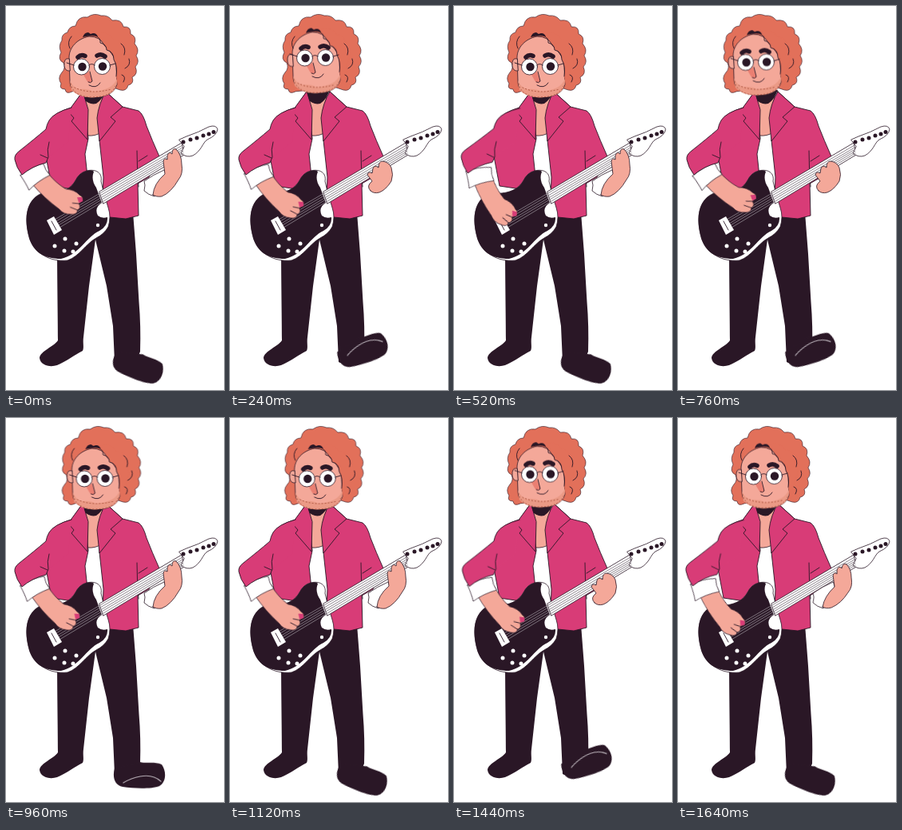
Write an HTML page without scripts that moves like this. It is 273x480 px and loops after 1.68 s.

```html
<!DOCTYPE html>
<html lang="en">
<head>
<meta charset="utf-8">
<title>Guitar player</title>
<style>
  html, body { margin: 0; width: 100%; height: 100%; overflow: hidden; background: #fff; }
  svg { display: block; width: 100vw; height: 100vh; }
  path, circle { stroke-linecap: round; stroke-linejoin: round; }
  .ink { fill: #2a1726; }
  .line { fill: none; stroke: #2a1726; stroke-width: .9; }
  .pink { fill: #d83c77; stroke: #2a1726; stroke-width: .9; }
  .skin { fill: #f4a899; stroke: #2a1726; stroke-width: .8; }
  .hair { fill: #e2705a; stroke: #2a1726; stroke-width: .6; }
  .white { fill: #fff; stroke: #2a1726; stroke-width: .8; }
  .plain { fill: #fff; }
  .bare { stroke: none; }

  .head, .nod, .foot, .crease, .strum, .elbow, .cuff, .fret { animation: 1680ms linear infinite; }
  .head { animation-name: sway; }
  .nod { animation-name: nod; }
  .foot { animation-name: tap; transform-origin: 143px 445px; }
  .crease { animation-name: crease; }
  .strum { animation-name: strum; transform-origin: 36px 208px; }
  .elbow { animation-name: elbow; transform-origin: 66px 145px; }
  .cuff { animation-name: cuff; }
  .fret { animation-name: fret; }

  @keyframes sway {
    0%, 31%, 76.2%, 100% { transform: none; }
    14.3% { transform: translate(-1px, 0); }
    45.2% { transform: translate(-10px, 0); }
    57.1% { transform: translate(3.5px, 0); }
  }
  /* applied to the face and again to its features, for depth */
  @keyframes nod {
    0%, 4%, 25%, 31%, 57.1%, 70%, 100% { transform: none; }
    14.3% { transform: translateY(-5.5px); }
    45.2%, 85% { transform: translateY(-2.8px); }
    76.2% { transform: translateY(-1px); }
    97.6% { transform: translateY(-1.5px); }
  }
  @keyframes tap {
    0%, 5%, 27%, 37%, 64%, 77%, 93%, 100% { transform: translateY(-4px) rotate(20deg); }
    11.9%, 19%, 43%, 50%, 82%, 87% { transform: translateY(-8px) rotate(-19deg); }
    57.1% { transform: none; }
  }
  @keyframes crease {
    0%, 6%, 26%, 38%, 61%, 78%, 92%, 100% { opacity: 0; transform: translateY(8px); }
    10%, 22%, 42%, 52%, 81%, 88% { opacity: 1; transform: none; }
    57.1% { opacity: 1; transform: translateY(10px); }
  }
  @keyframes strum {
    0%, 100% { transform: rotate(-2deg); }
    45.2% { transform: rotate(-5deg); }
    14.3%, 57.1%, 76.2% { transform: rotate(4deg); }
    31% { transform: translate(-3px, 1px) rotate(17deg); }
    97.6% { transform: translate(-2px, 1px) rotate(13deg); }
  }
  @keyframes elbow {
    0%, 17%, 45.2%, 57.1%, 76.2%, 100% { transform: none; }
    31% { transform: rotate(2.4deg); }
    97.6% { transform: rotate(1.4deg); }
  }
  @keyframes cuff {
    0%, 6%, 27%, 37%, 54%, 70%, 100% { opacity: 1; transform: none; }
    9%, 23%, 41%, 49%, 74%, 88% { opacity: 0; transform: none; }
    93%, 97.6% { opacity: 1; transform: translateX(-4px); }
  }
  @keyframes fret {
    0%, 5%, 28%, 38%, 55%, 69%, 100% {
      d: path("M184 236 Q185 222 199 210 L197 194 Q198 189 202 192 L202 187 Q204 181 208 185 Q208 177 213 179 Q220 186 220 198 Q222 210 216 217 Q207 233 195 238 Q188 239 184 236Z");
    }
    12%, 20%, 44%, 50%, 75%, 86% {
      d: path("M176 231 Q170 225 178 219 L172 211 Q173 206 178 209 L179 203 Q181 198 186 202 Q186 194 191 194 Q199 195 202 202 Q205 211 202 219 Q195 230 187 233 Q180 235 176 231Z");
    }
    94%, 97.6% {
      d: path("M181 236 Q183 223 196 211 L194 197 Q195 192 199 195 L199 190 Q201 184 205 188 Q206 181 211 183 Q217 189 217 200 Q219 211 213 218 Q204 232 192 237 Q185 239 181 236Z");
    }
  }
</style>
</head>
<body>
<svg viewBox="0 0 273 480" preserveAspectRatio="none">
  <!-- legs -->
  <path class="ink" d="M64 290 C64 345 65 385 65 418 C60 426 43 431 42 440 C43 449 55 452 64 449 C76 444 86 436 96 431 C98 427 96 421 97 414 L104 350 L112 292 L126 350 L134 400 L136 445 C146 450 164 446 168 432 Q169 400 166.500 370 L163 310 L159 258 H70Z"/>
  <g class="foot">
    <path class="ink" d="M136 438 C133 449 136 459 146 461 C160 463 181 464 192 460 C201 455 201 441 195 433 C187 429 176 432 168 430Z"/>
    <path class="crease" d="M147 446 Q157 440 168 438 Q184 435 194 444" fill="none" stroke="#b9b0b8" stroke-width="1.2"/>
  </g>

  <!-- torso -->
  <path class="plain" d="M97 148 L120 145 L126 268 H96Z"/>
  <path class="skin" d="M99 106 H121 L119 158 Q112 163 102 162Z"/>
  <path class="ink" d="M96 105 H125 Q120 118 113 122 Q104 124 97 116Z"/>
  <path class="pink" d="M96 107 L82 127 C68 131 58 137 54 145 L50 188 L57 225 L104 232 L99 185 L103 166Z"/>
  <path class="pink" d="M125 107 L146 126 L166 131 Q172 135 176 150 Q183 168 192 188 L179 214 L165 222 L166 262 L150 266 L120 263 L122 214 L117 168Z"/>
  <path class="pink" d="M96 107 L82 126 L78 132 L85 140 L82 144 L102 167 L103 130Z"/>
  <path class="pink" d="M125 107 L146 126 L131 139 L137 144 L117 169 L114 140 Q116 122 125 107Z"/>
  <path class="line" d="M164 181 Q164 203 166 226 M177 187 L166 194"/>

  <!-- guitar -->
  <path class="white" d="M101 206 C113 203 121 209 119 219 L122 232 L128 252 Q132 264 128 276 Q123 285 113 290 C100 297 92 313 77 318 C55 320 38 310 30 292 C22 267 25 242 45 234 C68 236 81 229 87 218 Q92 208 101 206Z"/>
  <path class="ink" d="M101 206 Q108 204 110 207 Q106 217 113 227 L120 246 Q110 252 115 262 Q120 266 127 264 Q128 275 117 281 C101 288 92 311 69 316 C47 316 34 307 29 290 C22 265 25 242 45 234 C68 236 81 229 87 218 Q92 208 101 206Z"/>
  <path class="white" d="M117 232 L220 171 L223 186 L122 247Z"/>
  <path class="white" d="M217 167 L226 163 Q241 158 254 151 Q263 148 265 154 Q264 162 252 167 C246 171 245 181 234 187 Q226 190 219 184 L223 176Z"/>
  <g class="ink">
    <circle cx="222" cy="170" r="2.5"/><circle cx="231" cy="167" r="2.5"/><circle cx="239" cy="165" r="2.5"/>
    <circle cx="247" cy="162" r="2.5"/><circle cx="254" cy="160" r="2.5"/><circle cx="260" cy="157.500" r="2.5"/>
  </g>
  <path d="M61 267 L221 174 M62 269.500 L222 176.500 M64 272 L222 179 M65 274.500 L222 181.500 M67 277 L222 184" fill="none" stroke="#847b84" stroke-width=".9"/>
  <path class="plain" d="M51 268 L60 263 L70 280 L60 286Z"/>
  <path class="line" d="M57 269 L63 280"/>
  <g class="plain">
    <circle cx="74" cy="291" r="2.5"/><circle cx="61" cy="300" r="2.5"/><circle cx="88" cy="297" r="2.5"/>
    <circle cx="73" cy="306" r="2.5"/><circle cx="84" cy="307" r="2.5"/><circle cx="115" cy="274" r="2.2"/>
  </g>

  <!-- fretting arm -->
  <path class="white cuff" d="M198 205 Q184 211 173 219 Q175 223 173 231 Q178 236 186 238 Q189 222 200 212Z"/>
  <path class="skin fret"/>

  <!-- strumming arm -->
  <g class="strum">
    <path class="skin" d="M32 222 L51 207 Q60 221 74 230 Q85 231 91 238 Q97 241 94 246 L90 249 Q93 254 88 257 Q87 263 80 262 Q70 262 65 255 Q47 241 32 222Z"/>
    <path class="line" d="M90 249 L82 248 M88 257 L79 253"/>
    <path d="M88 241 L94 241 L95 246 L90 248Z" fill="#d83c77"/>
    <path class="white" d="M18 211 Q31 201 47 197 Q49 206 55 212 Q39 219 28 230 Q25 222 18 211Z"/>
  </g>
  <g class="elbow">
    <path class="pink bare" d="M82 127 Q60 133 54 143 Q51 148 50 154 Q36 166 17 181 Q10 186 11 192 Q13 202 20 211 Q33 200 50 196 L53 189 L78 170Z"/>
    <path class="line" d="M82 127 Q60 133 54 143 Q51 148 50 154 Q36 166 17 181 Q10 186 11 192 Q13 202 20 211 Q33 200 50 196 L53 189 Q51 180 54 170 M52 190 L43 186"/>
  </g>

  <!-- head -->
  <g class="head">
    <path class="hair" d="M83 107 Q75 111 74 104 Q66 104 69 97 Q64 90 70 83 Q75 78 72 71 Q64 67 69 58 Q65 50 70 43 Q69 35 77 33 Q79 25 87 25 Q90 12 102 14 Q110 8 119 12 Q128 11 133 18 Q145 16 147 26 Q157 25 156 35 Q164 38 161 47 Q168 55 163 62 Q168 70 162 76 Q166 85 158 89 Q161 97 153 99 Q151 107 143 105 L134 102Z"/>
    <g class="nod">
      <path class="skin" d="M79 64 C79 52 89 41 104 38 Q118 38 123 49 C129 56 136 61 138 74 L139 98 C136 110 122 115 107 114 C91 113 80 107 80 94Z"/>
      <path d="M80 93 Q84 103 93 104 Q102 103 109 107 Q121 106 129 102 Q136 98 139 91 Q140 109 121 113 Q94 118 82 105Z" fill="#eb9a86"/>
      <path d="M81 97 Q84 113 107 114 Q133 114 138 98 M86 102 Q105 111 132 104" fill="none" stroke="#a84f3c" stroke-dasharray="1 3"/>
      <path class="skin" d="M79 66 Q72 64 73 75 Q74 82 80 81Z"/>
      <path class="hair bare" d="M112 36 Q126 43 126 55 Q135 55 135 67 Q140 75 138 88 L141 103 Q150 91 146 80 Q154 65 146 55 Q145 42 134 41 Q126 29 112 36Z"/>
      <path class="line" d="M112 37 Q119 40 118 46 Q126 48 126 55 Q135 57 135 67 Q140 75 138 88"/>
      <path class="ink" d="M96 39 Q98 33 103 33 L106 35 Q112 32 115 38 Q106 36 96 39Z"/>
      <g class="nod">
        <path d="M90 64 Q94 60 99 62.500 M114 62 Q119 59 124 63" fill="none" stroke="#2a1726" stroke-width="5.500"/>
        <path d="M97 86 L104 82 L108 94 Q104 98 101 93Z" fill="#ea7f72"/>
        <path class="line" d="M105 82 L108 94 Q106 97 103 95"/>
        <g class="white">
          <circle cx="94.500" cy="76" r="10"/><circle cx="120.500" cy="75.500" r="10"/>
        </g>
        <path class="line" d="M104 74 Q107 71 111 74 M85 74 L76 71 M130 74 L137 72"/>
        <g class="ink">
          <circle cx="95.500" cy="76" r="5.200"/><circle cx="121" cy="75.500" r="5.200"/>
        </g>
        <path class="line" d="M104 99 Q113 104 118 96"/>
      </g>
    </g>
    <path class="line" d="M144 47 Q151 52 148 61 M154 66 Q157 74 149 78 M145 86 Q151 88 147 95 M82 38 Q76 45 80 53"/>
  </g>
</svg>
</body>
</html>
```
